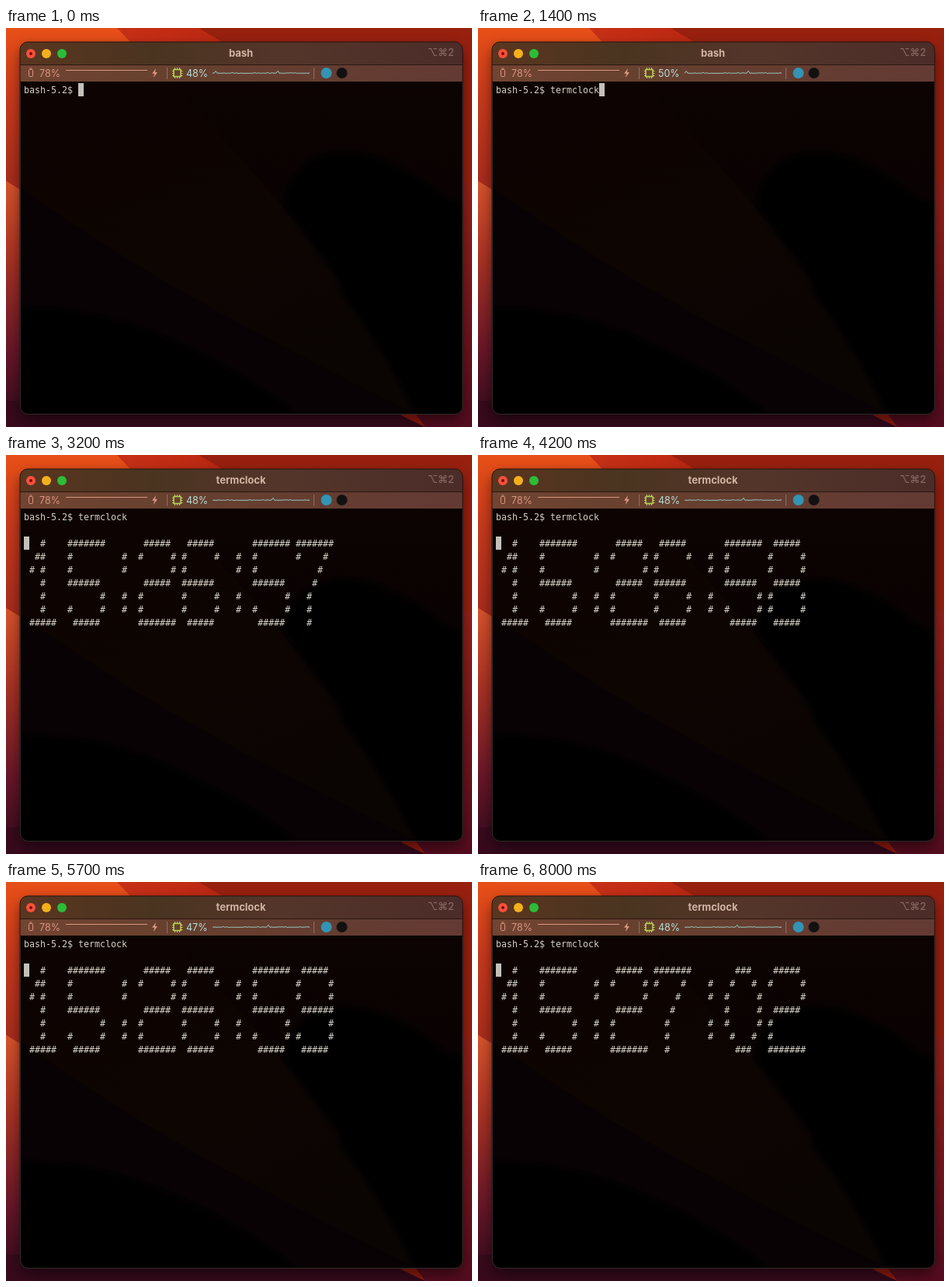
Recreate the animation shown at these times as an HTML page. Size 600 by 514 pixels, loop 8.1 s.

```html
<!DOCTYPE html>
<html lang="en">
<head>
<meta charset="utf-8">
<title>Terminal clock</title>
<style>
  html, body { margin: 0; width: 100%; height: 100%; overflow: hidden; background: #200610; }
  svg { display: block; width: 600px; height: 514px; }
  .ui { font: 13px Inter, "Noto Sans", sans-serif; }
  .mono text { font: 11.63px "DejaVu Sans Mono", monospace; fill: #d6d2c6; white-space: pre; }
</style>
</head>
<body>
<svg viewBox="0 0 600 514" xmlns="http://www.w3.org/2000/svg">
  <defs>
    <linearGradient id="sky">
      <stop offset="0" stop-color="#cc3a1c"/>
      <stop offset=".35" stop-color="#c22c14"/>
      <stop offset=".7" stop-color="#a62010"/>
      <stop offset="1" stop-color="#8c180e"/>
    </linearGradient>
    <linearGradient id="petal" x2="0" y2="1">
      <stop offset="0" stop-color="#e85018"/>
      <stop offset=".3" stop-color="#c83a1c"/>
      <stop offset="1" stop-color="#8c201c"/>
    </linearGradient>
    <linearGradient id="glow" x2="0" y2="1">
      <stop offset="0" stop-color="#d8542c"/>
      <stop offset=".3" stop-color="#ac3424"/>
      <stop offset=".7" stop-color="#661628"/>
      <stop offset="1" stop-color="#300a1c"/>
    </linearGradient>
    <linearGradient id="edge" x2="0" y2="1">
      <stop offset="0" stop-color="#a42818"/>
      <stop offset=".5" stop-color="#841a1c"/>
      <stop offset="1" stop-color="#560c20"/>
    </linearGradient>
    <linearGradient id="title">
      <stop offset="0" stop-color="#5a3620"/>
      <stop offset=".3" stop-color="#4a3420"/>
      <stop offset=".6" stop-color="#54352a"/>
      <stop offset="1" stop-color="#4c2c28"/>
    </linearGradient>
    <linearGradient id="status">
      <stop offset="0" stop-color="#724432"/>
      <stop offset=".35" stop-color="#66402e"/>
      <stop offset="1" stop-color="#643a34"/>
    </linearGradient>
    <linearGradient id="body" x2="0" y2="1">
      <stop offset="0" stop-color="#0c0302"/>
      <stop offset=".5" stop-color="#080202"/>
      <stop offset="1" stop-color="#050104"/>
    </linearGradient>
    <linearGradient id="fold" x2=".5" y2="1">
      <stop offset="0" stop-color="#0d0302"/>
      <stop offset=".6" stop-color="#0d0502"/>
      <stop offset="1" stop-color="#0a0402"/>
    </linearGradient>
    <filter id="blur" x="-20%" y="-20%" width="140%" height="140%"><feGaussianBlur stdDeviation="9"/></filter>
    <filter id="soft"><feGaussianBlur stdDeviation="5"/></filter>
    <clipPath id="frame"><rect x="18" y="18" width="570" height="479.5" rx="10"/></clipPath>
  </defs>

  <g id="wallpaper">
    <rect width="600" height="514" fill="url(#sky)"/>
    <path d="M0 0H143Q200 60 260 130L100 300L0 197Z" fill="url(#petal)"/>
    <path d="M248 0Q400 90 600 203V0Z" fill="#98200f"/>
    <path d="M0 197Q120 270 300 400L540 514H0Z" fill="url(#glow)"/>
    <path d="M0 480H490L525 514H0Z" fill="#380a1c"/>
    <path d="M430 105L600 203V514H540L470 420Z" fill="url(#edge)"/>
    <rect x="18" y="26" width="570" height="480" rx="12" filter="url(#blur)" opacity=".5"/>
  </g>

  <g clip-path="url(#frame)">
    <rect x="18" y="69" width="570" height="429" fill="url(#body)"/>
    <path d="M210 69Q330 195 400 285T530 498H18V69Z" fill="url(#fold)"/>
    <path d="M358 228C368 145 470 125 588 240V498H530Q480 390 400 285Z" fill="#060102" filter="url(#soft)"/>
    <path d="M430 340Q470 210 588 225V498H530Q490 410 430 340Z" fill="#040002" filter="url(#soft)"/>
    <path d="M18 205Q150 300 300 380T530 498H18Z" fill="#080204"/>
    <path d="M18 360Q120 358 220 405T375 498H18Z" fill="#040002" filter="url(#soft)"/>
    <rect x="18" y="18" width="570" height="29" fill="url(#title)"/>
    <rect x="18" y="47" width="570" height="22" fill="url(#status)"/>
    <path d="M18 47.5H588" stroke="#2a1812"/>
  </g>
  <rect x="18" y="18" width="570" height="479.5" rx="10" fill="none" stroke="#22140e"/>
  <path d="M18.5 70V487.5a10 10 0 0 0 10 10H578a10 10 0 0 0 10-10V70" fill="none" stroke="#2e2a28"/>

  <circle cx="32" cy="33" r="6" fill="#f8503c"/>
  <circle cx="32" cy="33" r="2" fill="#760c08"/>
  <circle cx="52" cy="33" r="6" fill="#f4b01c"/>
  <circle cx="72" cy="33" r="6" fill="#2cbc38"/>

  <g class="ui">
    <text id="name" x="302.5" y="37" text-anchor="middle" font-weight="700" fill="#d2b4a4"></text>
    <text x="577" y="36" text-anchor="end" font-weight="500" fill="#886860">⌥⌘2</text>
    <g fill="none" stroke="#d89480">
      <rect x="29.5" y="53.5" width="5" height="9" rx="1"/>
      <path d="M30.5 52H33.5M77 54.5H182"/>
    </g>
    <text x="43" y="62.5" font-size="12.5" fill="#d89480">78%</text>
    <path d="M193 52L188 58.7H191L190 64L195 57H192Z" fill="#d89480"/>
    <path d="M207.5 51V66M396.5 51V66" stroke="#8e7060"/>
    <g fill="none" stroke="#b8d458">
      <rect x="216" y="53.5" width="9" height="9" stroke-width="1.5"/>
      <path d="M217.5 51V53M220.5 51V53M223.5 51V53M217.5 63V65M220.5 63V65M223.5 63V65M214 55.5H216M214 58.5H216M214 61.5H216M225 55.5H227.5M225 58.5H227.5M225 61.5H227.5"/>
    </g>
    <text id="load" x="232" y="62.5" font-size="12.5" fill="#b4dcd8"></text>
    <path id="spark" fill="none" stroke="#98ccc8" stroke-linejoin="round"/>
    <circle cx="412.5" cy="58" r="7" fill="#3494b4"/>
    <circle cx="432.5" cy="58" r="6.8" fill="#121010" stroke="#262020" stroke-width=".8"/>
  </g>

  <rect id="cursor" width="7" height="17" fill="#c6c0ba"/>
  <g id="lines" class="mono"></g>
</svg>

<script>
const LOOP = 8100, STEP = 100;
const COL = 7, ROW = 17, LEFT = 23, TOP = 71;
const PROMPT = "bash-5.2$ ", COMMAND = "termclock";
const TYPE_START = 400, TYPE_STEP = 100, RUN = 1850;
const FIRST = 15 * 3600 + 26 * 60 + 56;
const LOADS = [48, 50, 49, 48, 48, 48, 47, 48, 48];
const SLOTS = [0, 8, 16, 21, 29, 37, 42, 50];

const GLYPHS = {
  0: "  ###/ #   #/#     #/#     #/#     #/ #   #/  ###",
  1: "   #/  ##/ # #/   #/   #/   #/ #####",
  2: " #####/#     #/      #/ #####/#/#/#######",
  5: "#######/#/#/######/      #/#     #/ #####",
  6: " #####/#     #/#/######/#     #/#     #/ #####",
  7: "#######/#    #/    #/   #/  #/  #/  #",
  8: " #####/#     #/#     #/ #####/#     #/#     #/ #####",
  9: " #####/#     #/#     #/ ######/      #/#     #/ #####",
  ":": "/  #/  #//  #/  #/"
};

const $ = id => document.getElementById(id);
const lines = Array.from({ length: 9 }, (_, row) => {
  const line = document.createElementNS("http://www.w3.org/2000/svg", "text");
  line.setAttribute("x", LEFT);
  line.setAttribute("y", TOP + 13 + row * ROW);
  return $("lines").appendChild(line);
});

function setText(el, text) {
  if (el.textContent !== text) el.textContent = text;
}

// Non-breaking spaces keep every column in place.
function setLine(row, text) {
  setText(lines[row], text.replaceAll(" ", "\u00a0"));
}

function moveCursor(col, row) {
  $("cursor").setAttribute("x", LEFT + col * COL);
  $("cursor").setAttribute("y", TOP + row * ROW);
}

function clockText(seconds) {
  return [seconds / 3600, seconds / 60 % 60, seconds % 60]
    .map(n => String(Math.floor(n)).padStart(2, "0")).join(":");
}

function bannerRow(text, row) {
  return [...text].reduce((out, ch, i) =>
    out.padEnd(SLOTS[i]) + GLYPHS[ch].split("/")[row], "");
}

// Load history: faint noise with two remembered bumps.
function sample(i) {
  if (i === 2) return 55.5;
  if (i === 41) return 55.3;
  const noise = Math.sin(i * 127.1 + 3) * 43758.5;
  return 57.6 + (noise - Math.floor(noise)) * 0.9;
}

function sparkPath(shift) {
  let d = "";
  for (let i = 0; i <= 61; i++) {
    d += (i ? "L" : "M") + (266 + i * 2.05).toFixed(2) + " " + sample(i + shift).toFixed(2);
  }
  return d;
}

function render(t) {
  const running = t >= RUN;
  const typed = Math.floor((t - TYPE_START) / TYPE_STEP) + 1;
  const count = Math.max(0, Math.min(COMMAND.length, typed));
  const tick = Math.floor(t / 1000 + 0.4);
  const clock = running ? clockText(FIRST + Math.floor((t - RUN) / 1000)) : "";

  setText($("name"), running ? COMMAND : "bash");
  setText($("load"), LOADS[tick] + "%");
  $("spark").setAttribute("d", sparkPath(tick));
  setLine(0, PROMPT + COMMAND.slice(0, count));
  for (let row = 0; row < 7; row++) setLine(row + 2, bannerRow(clock, row));
  if (running) moveCursor(0, 2);
  else moveCursor(PROMPT.length + count, 0);
}

const start = performance.now();
function loop() {
  const t = (performance.now() - start) % LOOP;
  render(Math.floor(t / STEP) * STEP);
  requestAnimationFrame(loop);
}
loop();
</script>
</body>
</html>
```
